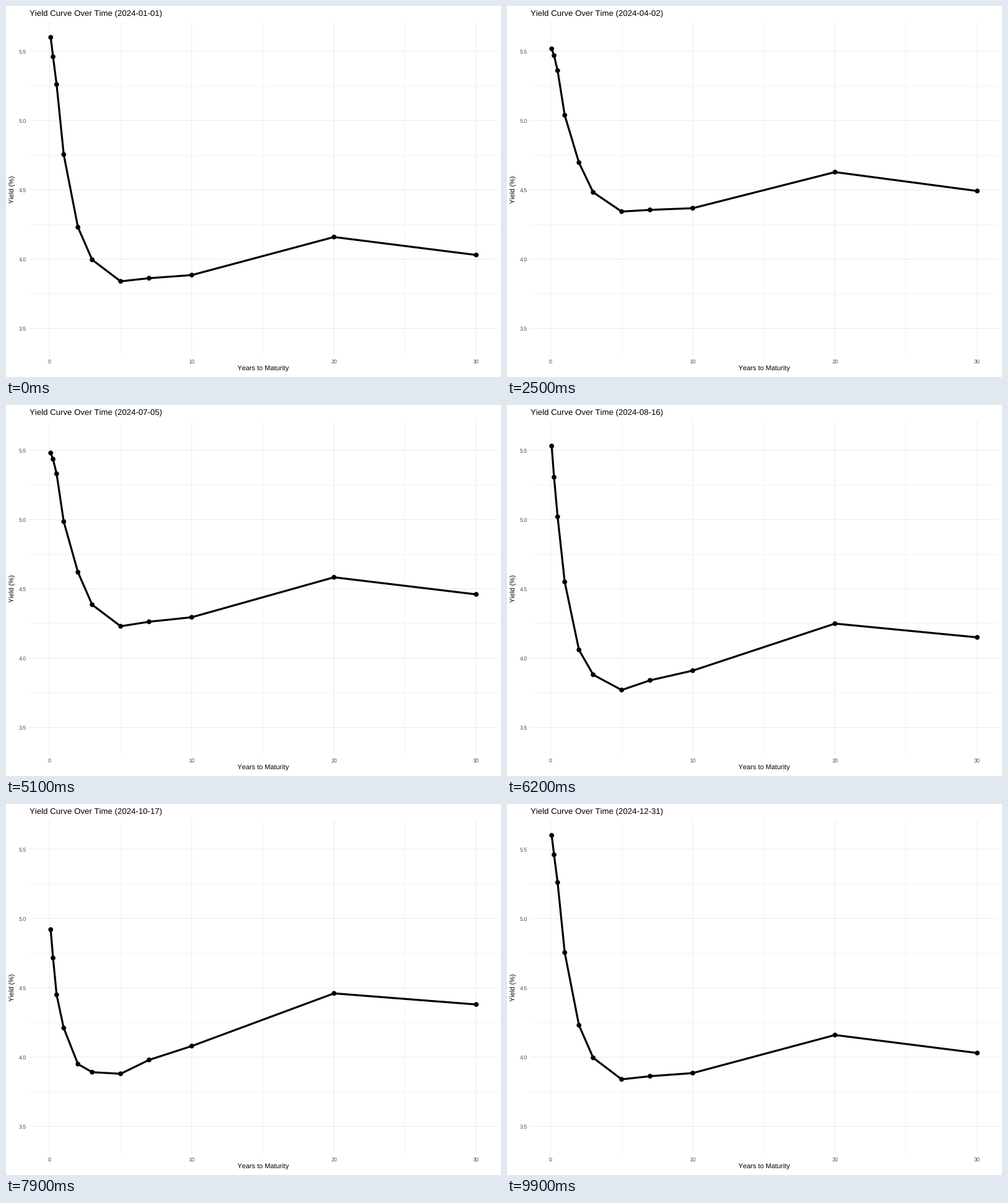
These frames come from a looping animation (800x600 px, 10 s). A matplotlib script:

```python
import numpy as np
import matplotlib.pyplot as plt
from matplotlib.animation import FuncAnimation

W, H, DPI = 800, 600, 72
FRAMES = 100
DAYS = 262  # weekdays in the year

plt.rcParams.update({
    "font.family": "Liberation Sans",
    "text.hinting": "none",
    "text.kerning_factor": 6,
})

YEARS = np.array([1 / 12, 0.25, 0.5, 1, 2, 3, 5, 7, 10, 20, 30])


def px(years):
    return 70.3 + 22.99 * np.asarray(years)


def py(rate):
    return 73.1 + 224.2 * (5.5 - np.asarray(rate))


def track(step, *points):
    """Straight moves through (step, value) key points."""
    return np.interp(step, *zip(*points))


def curve(step):
    """Yields at a step; the last step wraps round to the first curve."""
    step %= FRAMES - 1
    m1 = track(step, (0, 5.60), (16, 5.53), (51, 5.48), (62, 5.53),
               (70, 5.15), (71, 4.90), (79, 4.92), (98, 4.44))
    m6 = track(step, (0, 5.26), (16, 5.30), (34, 5.42), (51, 5.33),
               (62, 5.02), (72, 4.45), (79, 4.45), (98, 4.29))
    y5 = track(step, (0, 3.84), (1, 3.97), (8, 4.00), (13, 4.29),
               (16, 4.26), (19, 4.07), (21, 4.31), (24, 4.21),
               (27, 4.61), (31, 4.66), (34, 4.48), (37, 4.40),
               (40, 4.58), (45, 4.22), (49, 4.44), (51, 4.23),
               (57, 4.03), (59, 3.73), (62, 3.77), (64, 3.64),
               (70, 3.41), (75, 3.60), (76, 3.86), (79, 3.88),
               (84, 4.27), (92, 4.06), (98, 4.45))
    # Spreads against the five-year: two-year above, thirty-year above
    front = track(step, (0, 0.39), (34, 0.34), (51, 0.39), (62, 0.29),
                  (79, 0.07), (98, -0.14))
    back = track(step, (0, 0.19), (16, 0.12), (51, 0.23), (62, 0.38),
                 (74, 0.58), (79, 0.50), (86, 0.31), (98, 0.37))
    y2 = y5 + front
    y10 = y5 + 0.5 * back - 0.05
    return np.array([
        m1,
        (m1 + m6) / 2 + 0.03,
        m6,
        (m6 + y2) / 2 + 0.01,
        y2,
        0.45 * y2 + 0.55 * y5 - 0.02,
        y5,
        (y5 + y10) / 2,
        y10,
        y5 + 0.84 * back + 0.16,
        y5 + back,
    ])


def heading(step):
    """Each weekday is a hold followed by a move, sampled evenly."""
    slot = round(step * (2 * DAYS - 1) / (FRAMES - 1))
    day = np.busday_offset("2024-01-01", slot // 2)
    return f"Yield Curve Over Time ({day})"


fig = plt.figure(figsize=(W / DPI, H / DPI), dpi=DPI, facecolor="white")
ax = fig.add_axes([0, 0, 1, 1])
ax.set_xlim(0, W)
ax.set_ylim(H, 0)
ax.axis("off")

LEFT, RIGHT, TOP, BOTTOM = 37.8, 794.5, 26.1, 566


def grid(xs, ys, width):
    style = dict(color="#EBEBEB", lw=width, snap=False, zorder=1,
                 solid_capstyle="butt")
    for y in py(ys):
        ax.plot([LEFT, RIGHT], [y, y], **style)
    for x in px(xs):
        ax.plot([x, x], [TOP, BOTTOM], **style)


def label(x, y, text, size, color="black", ha="center", **kw):
    return ax.text(x, y, text, fontsize=size, color=color, ha=ha,
                   va="baseline", **kw)


X_TICKS = np.arange(0, 31, 10)
Y_TICKS = np.arange(3.5, 5.6, 0.5)
grid(X_TICKS[:-1] + 5, Y_TICKS[:-1] + 0.25, 0.53)
grid(X_TICKS, Y_TICKS, 1.07)

for v in X_TICKS:
    label(px(v), 578, str(v), 8.8, "#4D4D4D")
for v in Y_TICKS:
    label(33, py(v) + 3.6, f"{v:.1f}", 8.8, "#4D4D4D", ha="right")
label(416.1, 590, "Years to Maturity", 11)
label(14, 296.3, "Yield (%)", 11, rotation=90, rotation_mode="anchor")
title = label(37.8, 16, "", 13.2, ha="left")

line, = ax.plot([], [], color="black", lw=3.2, solid_joinstyle="round",
                solid_capstyle="butt", snap=False, zorder=3)
# One size per dot keeps their positions off the pixel grid
dots = ax.scatter(px(YEARS), py(curve(0)), s=np.full(len(YEARS), 7.8 ** 2),
                  color="black", linewidths=0, zorder=4)


def draw(step):
    x, y = px(YEARS), py(curve(step))
    line.set_data(x, y)
    dots.set_offsets(np.column_stack([x, y]))
    title.set_text(heading(step))
    return line, dots, title


anim = FuncAnimation(fig, draw, frames=FRAMES, interval=100, repeat=True,
                     repeat_delay=0, blit=False)
plt.show()
```
